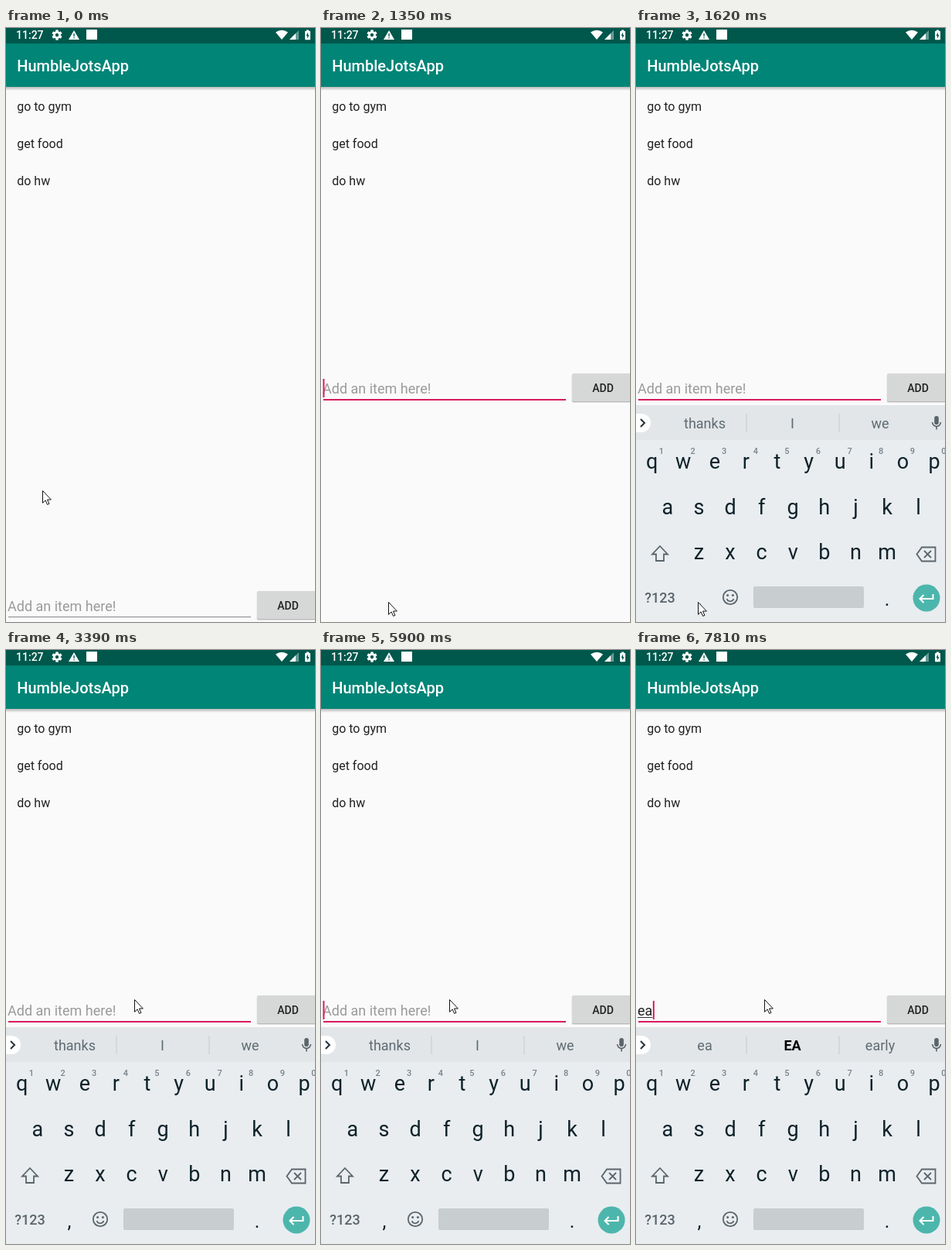
These frames come from a looping animation (400 px wide and 767 px high, 8 s). An HTML page with a canvas:

```html
<!DOCTYPE html>
<html lang="en">
<head>
<meta charset="utf-8">
<title>To-do list</title>
<style>
html, body { margin: 0; width: 100%; height: 100%; overflow: hidden; background: #fafafa; }
canvas { display: block; width: 400px; height: 767px; }
</style>
</head>
<body>
<canvas id="stage"></canvas>
<script>
const W = 400, H = 767, LOOP = 8000;
const canvas = document.getElementById('stage');
const ctx = canvas.getContext('2d');
const ratio = window.devicePixelRatio || 1;
canvas.width = W * ratio;
canvas.height = H * ratio;

const PINK = '#d81b60', ICON = '#5a656b', INK = '#0e2229', DARK = '#00574b';

// Step tracks: [start ms, value...]
const POINTER = [
  [0, 47, 597], [120, 59, 622], [270, 72, 678], [390, 85, 730], [550, 86, 739],
  [700, 87, 741], [1620, 80, 741], [1770, 98, 690], [1890, 126, 593],
  [2040, 166, 515], [2190, 160, 485], [2310, 158, 463], [2460, 166, 451]
];
const CARET = [
  [0, false], [1070, true], [1500, false], [1890, true], [2460, false], [2860, true],
  [3390, false], [3950, true], [4350, false], [4940, true], [5370, false], [5900, true],
  [6460, false], [6860, true], [7390, false], [7510, true]
];
const TYPED = [[0, ''], [7510, 'e'], [7660, 'ea']];
const WORDS = [
  [0, 'thanks', 'I', 'we'], [7660, 'e', 'E', 'even'], [7810, 'ea', 'EA', 'early']
];
const FOCUS = 950, LIFT = 1350, KEYBOARD = 1500;

function at(track, t) {
  let found = track[0];
  for (const step of track) if (step[0] <= t) found = step;
  return found.slice(1);
}

function rect(x, y, w, h, color) {
  ctx.fillStyle = color;
  ctx.fillRect(x, y, w, h);
}

function text(str, x, y, size, color, weight = 400, align = 'left') {
  ctx.font = `${weight} ${size}px Roboto, sans-serif`;
  ctx.textAlign = align;
  ctx.fillStyle = color;
  ctx.fillText(str, x, y);
}

function trace(points, closed) {
  ctx.beginPath();
  for (let i = 0; i < points.length; i += 2) ctx.lineTo(points[i], points[i + 1]);
  if (closed) ctx.closePath();
}

function poly(points, color) {
  trace(points, true);
  ctx.fillStyle = color;
  ctx.fill();
}

function line(points, color, width, closed = false) {
  trace(points, closed);
  ctx.strokeStyle = color;
  ctx.lineWidth = width;
  ctx.stroke();
}

function disc(x, y, r, color) {
  ctx.beginPath();
  ctx.arc(x, y, r, 0, Math.PI * 2);
  ctx.fillStyle = color;
  ctx.fill();
}

function arc(x, y, r, from, to, color, width) {
  ctx.beginPath();
  ctx.arc(x, y, r, from, to);
  ctx.strokeStyle = color;
  ctx.lineWidth = width;
  ctx.stroke();
}

function roundRect(x, y, w, h, r, color) {
  ctx.beginPath();
  ctx.moveTo(x + r, y);
  ctx.arcTo(x + w, y, x + w, y + h, r);
  ctx.arcTo(x + w, y + h, x, y + h, r);
  ctx.arcTo(x, y + h, x, y, r);
  ctx.arcTo(x, y, x + w, y, r);
  ctx.fillStyle = color;
  ctx.fill();
}

function statusBar() {
  rect(0, 0, W, 20, DARK);
  text('11:27', 13, 14, 14, '#fff', 500);

  // Gear
  for (let i = 0; i < 6; i++) {
    const a = i * Math.PI / 3 + Math.PI / 6;
    const dx = Math.cos(a), dy = Math.sin(a);
    line([66, 9, 66 + dx * 6.6, 9 + dy * 6.6], '#fff', 3.4);
  }
  disc(66, 9, 4.9, '#fff');
  disc(66, 9, 2.2, DARK);

  // Warning
  poly([88, 3, 95, 15, 81, 15], '#fff');
  rect(87.4, 7, 1.3, 4, DARK);
  rect(87.4, 12, 1.3, 1.4, DARK);

  rect(104, 2, 14, 13, '#fff');

  // Wi-Fi
  ctx.beginPath();
  ctx.moveTo(357, 15);
  ctx.lineTo(349, 5.6);
  ctx.quadraticCurveTo(357, 0, 365, 5.6);
  ctx.closePath();
  ctx.fillStyle = '#fff';
  ctx.fill();

  // Signal
  poly([379, 3, 379, 15, 367, 15], 'rgba(255,255,255,.4)');
  poly([375, 7, 375, 15, 367, 15], '#fff');

  // Battery
  rect(389, 2.5, 3, 2, '#fff');
  roundRect(387, 3.7, 7, 11.5, 1, '#fff');
  poly([391, 5.5, 388.5, 10, 390, 10, 390, 13.5, 392.5, 9, 391, 9], DARK);
}

function appBar() {
  const shade = ctx.createLinearGradient(0, 76, 0, 81);
  shade.addColorStop(0, 'rgba(0,0,0,.27)');
  shade.addColorStop(1, 'rgba(0,0,0,0)');
  rect(0, 76, W, 5, shade);
  rect(0, 20, W, 56, '#008577');
  text('HumbleJotsApp', 14.2, 56, 20, '#fff', 500);
}

function entryRow(t) {
  const y = t < LIFT ? 281 : 0;
  const typed = at(TYPED, t)[0];
  if (t < FOCUS) rect(3, y + 479, 314, 1, '#868686');
  else rect(3, y + 479, 314, 2, PINK);

  text(typed || 'Add an item here!', 2, y + 472, 18, typed ? '#212121' : '#9a9a9a');
  const width = typed ? ctx.measureText(typed).width : 0;
  if (typed) rect(2, y + 474, width, 1, '#333');
  if (at(CARET, t)[0]) rect(2.5 + width, y + 453, 2, 24, PINK);

  roundRect(324.5, y + 447, 81, 37, 2.5, 'rgba(0,0,0,.1)');
  roundRect(325, y + 447, 80, 36, 2, 'rgba(0,0,0,.18)');
  roundRect(325, y + 446, 80, 36, 2, '#d6d7d7');
  text('ADD', 365, y + 469.5, 14, '#202020', 500, 'center');
}

function suggestions(t) {
  rect(0, 487, W, 45, '#e2e6e9');
  const words = at(WORDS, t);
  const typing = t >= WORDS[1][0];
  [89, 202.5, 316].forEach((x, i) => {
    const strong = typing && i === 1;
    text(words[i], x, 516.5, 18, strong ? '#000' : '#5f6b71', strong ? 700 : 400, 'center');
  });
  rect(142.5, 498, 1, 24, '#c5cacd');
  rect(262.5, 498, 1, 24, '#c5cacd');

  // Expand chip
  roundRect(-20, 498, 39, 24, 12, '#fff');
  line([6, 505, 11, 510, 6, 515], '#263238', 2);

  // Microphone
  roundRect(386.2, 501, 5.6, 11, 2.8, ICON);
  arc(389, 509, 5.4, 0, Math.PI, ICON, 1.6);
  rect(388.2, 514, 1.6, 4.5, ICON);
}

function letters(row, x, y) {
  [...row].forEach((key, i) => text(key, x + i * 40.6, y, 27, INK, 400, 'center'));
}

function keyboard(t) {
  rect(0, 532, W, 235, '#e9edf0');
  suggestions(t);
  letters('qwertyuiop', 20.6, 569);
  letters('asdfghjkl', 40.8, 627.5);
  letters('zxcvbnm', 81.4, 686);
  [...'1234567890'].forEach((d, i) =>
    text(d, 33 + i * 40.6, 550, 11, '#78838a', 500, 'center'));

  // Shift
  ctx.lineJoin = 'miter';
  line([31, 669, 41, 679.5, 36, 679.5, 36, 688, 26, 688, 26, 679.5, 21, 679.5], ICON, 1.8, true);

  // Backspace
  line([370, 670.5, 387.5, 670.5, 387.5, 688.5, 370, 688.5, 363.5, 679.5], ICON, 1.8, true);
  line([373, 675, 382, 684], ICON, 1.8);
  line([382, 675, 373, 684], ICON, 1.8);

  text('?123', 31, 742, 18, ICON, 500, 'center');
  text(',', 82, 745.5, 25, INK, 400, 'center');
  text('.', 325, 745.5, 25, INK, 400, 'center');

  // Smiley
  arc(122, 735, 9.2, 0, Math.PI * 2, ICON, 1.8);
  disc(118.6, 732.5, 1.5, ICON);
  disc(125.4, 732.5, 1.5, ICON);
  arc(122, 735.5, 4.8, 0.35, Math.PI - 0.35, ICON, 1.7);

  roundRect(152, 721, 143, 28, 2, '#c8cdd0');

  // Enter
  disc(376, 736, 17.5, '#4db6ac');
  line([384.5, 731, 384.5, 737, 368, 737], '#fff', 2);
  line([372.5, 732, 367.5, 737, 372.5, 742], '#fff', 2);
}

function pointer(t) {
  const [x, y] = at(POINTER, t);
  const shape = [.5, .5, .5, 16.3, 4.1, 12.9, 6.6, 18.4, 8.9, 17.4, 6.5, 12, 11.4, 12];
  ctx.save();
  ctx.translate(x, y);
  poly(shape, '#fff');
  line(shape, '#111', 1, true);
  ctx.restore();
}

function draw(t) {
  ctx.setTransform(ratio, 0, 0, ratio, 0, 0);
  rect(0, 0, W, H, '#fafafa');
  appBar();
  statusBar();
  ['go to gym', 'get food', 'do hw'].forEach((item, i) =>
    text(item, 14.2, 106.5 + i * 48, 16, '#212121'));
  entryRow(t);
  if (t >= KEYBOARD) keyboard(t);
  pointer(t);
}

const start = performance.now();
function tick() {
  draw((performance.now() - start) % LOOP);
  requestAnimationFrame(tick);
}
tick();
</script>
</body>
</html>
```
